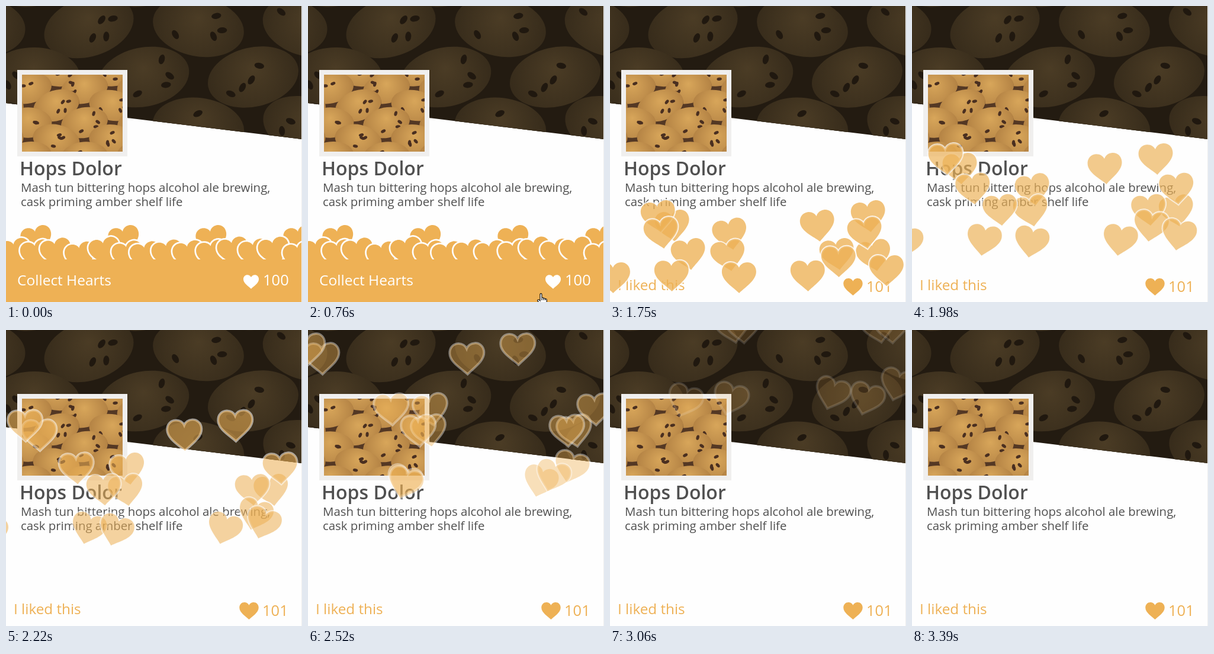
Write an HTML page with a canvas that moves like this. It is 500 px wide and 500 px high and loops after 4.56 s.

```html
<!DOCTYPE html>
<html lang="en">
<head>
<meta charset="utf-8">
<title>Collect Hearts</title>
<style>
  html, body { margin: 0; height: 100%; overflow: hidden; background: #fefefe; }
  canvas { display: block; width: 100vw; height: 100vh; }
</style>
</head>
<body>
<canvas id="stage" width="500" height="500"></canvas>
<script>
const ctx = document.getElementById('stage').getContext('2d');
const LOOP = 4560, CURSOR_IN = 760, BURST = 1596, STEP = 77, BURST_END = 3367;
const ORANGE = '#eeb155', WHITE = '#fefefe', INK = '#505050';

const heartPath = new Path2D('M0 27C-10 17-29 6-29-9C-29-19-22-25-14-25C-7-25-2-21 0-16' +
  'C2-21 7-25 14-25C22-25 29-19 29-9C29 6 10 17 0 27Z');
const handPath = new Path2D('M5 2.5Q5 .7 6.5 .7T8 2.5V8Q10 7 11 8.7Q13 8 13.7 9.7' +
  'Q16.3 9 16.3 12V15Q16 18 14.5 19V22H7.5V20Q5 17 1 13.5Q0 11.5 2 11Q3.5 11 5 13Z');

// Hearts of a flow drift in a straight line (px per ms) while turning towards a tilt.
// Two steps into the burst they stand at xs, alternately below and above y by spread.
const flows = [
  { vx: -.107, vy: -.42, tilt: -2, y: 363, spread: 8, xs: [106, 82, 351, 437] },
  { vx: .006, vy: -.326, tilt: -10, y: 403, spread: 18, xs: [446, 203, 200] },
  { vx: .07, vy: -.324, tilt: -4, y: 401, spread: 18, xs: [133, 87, 384, 431] },
  { vx: .076, vy: -.259, tilt: 16, y: 443, spread: 12, xs: [104, 386, 334] },
  { vx: -.07, vy: -.259, tilt: 18, y: 452, spread: 6, xs: [5, 467, 218] }
];

const radians = degrees => degrees * Math.PI / 180;

// Repeatable random numbers in -1..1
function randomizer(seed) {
  return () => {
    const n = Math.sin(seed++ * 12.9898) * 43758.5453;
    return (n - Math.floor(n)) * 2 - 1;
  };
}

function heart(x, y, scale, tilt, color, outline) {
  ctx.save();
  ctx.translate(x, y);
  ctx.rotate(radians(tilt));
  ctx.scale(scale, scale);
  if (outline) {
    ctx.strokeStyle = WHITE;
    ctx.lineWidth = outline;
    ctx.stroke(heartPath);
  }
  ctx.fillStyle = color;
  ctx.fill(heartPath);
  ctx.restore();
}

function text(str, x, y, size, color, weight = 400) {
  ctx.font = `${weight} ${size}px "Open Sans", "Noto Sans", sans-serif`;
  ctx.fillStyle = color;
  ctx.fillText(str, x, y);
}

function ellipse(x, y, rx, ry, tilt, color) {
  ctx.beginPath();
  ctx.ellipse(x, y, rx, ry, radians(tilt), 0, 7);
  ctx.fillStyle = color;
  ctx.fill();
}

// Cookies laid like bricks around (x0, y0), each with a few scattered chips
function cookies(outline, x0, y0, dx, dy, colors) {
  const random = randomizer(7);
  const rx = dx * .42, ry = dx * .27, chip = dx * .045;
  ctx.save();
  ctx.beginPath();
  outline.forEach(([x, y]) => ctx.lineTo(x, y));
  ctx.clip();
  ctx.fillStyle = colors.gap;
  ctx.fillRect(0, 0, 500, 260);
  for (let row = -2; row < 4; row++)
    for (let col = -1; col < 3; col++) {
      const x = x0 + dx * (col + (row & 1) / 2), y = y0 + dy * row;
      const tilt = random() * 18;
      const shade = ctx.createRadialGradient(x, y - ry * .3, 0, x, y, rx * 1.1);
      shade.addColorStop(0, colors.light);
      shade.addColorStop(1, colors.dark);
      ellipse(x, y + ry * .06, rx, ry, tilt, colors.gap);
      ellipse(x, y, rx, ry, tilt, shade);
      for (let i = 0; i < 4; i++)
        ellipse(x + random() * rx * .6, y + random() * ry * .6, chip, chip * .6, random() * 90, colors.chip);
    }
  ctx.restore();
}

function card() {
  ctx.fillStyle = WHITE;
  ctx.fillRect(0, 0, 500, 500);
  cookies([[0, 0], [500, 0], [500, 225], [0, 164]], 140, 35, 185, 85,
    { gap: '#231b11', light: '#4b3c25', dark: '#352a1a', chip: '#20180f' });
  ctx.fillStyle = '#f0efee';
  ctx.fillRect(19, 108, 186, 146);
  cookies([[27, 116], [197, 116], [197, 246], [27, 246]], 85, 168, 95, 29,
    { gap: '#543824', light: '#d8a65a', dark: '#b07f42', chip: '#4a2f20' });
  text('Hops Dolor', 23, 286, 32, INK, 600);
  text('Mash tun bittering hops alcohol ale brewing,', 25, 314, 20.4, INK);
  text('cask priming amber shelf life', 25, 338, 20.4, INK);
}

// A heap of hearts in which every fourth one stands tall behind the others
function pile() {
  const random = randomizer(3);
  const column = i => 15 + 37 * i;
  for (let i = 1; i < 14; i += 4) heart(column(i), 395, .9, -12, ORANGE, 6);
  for (let i = 0; i < 14; i++) heart(column(i) + random() * 6, 418 + random() * 5, .9, -12, ORANGE, 6);
}

function footer() {
  pile();
  ctx.fillStyle = ORANGE;
  ctx.fillRect(0, 428, 500, 72);
  text('Collect Hearts', 19, 472, 24.5, '#fff');
  heart(414, 465.5, .45, 0, '#fff');
  text('100', 434, 472, 25.5, '#fff');
}

function likedFooter() {
  text('I liked this', 13, 480, 24.3, ORANGE);
  heart(410.5, 474, .56, 0, ORANGE);
  text('101', 433, 483, 25.5, ORANGE);
}

function burst(t) {
  const age = t - BURST - 2 * STEP;
  const turn = Math.min(1, Math.max(0, (age + 250) / 650));
  ctx.globalAlpha = Math.min(1, .78 * (BURST_END - t) / (BURST_END - BURST - 2 * STEP));
  for (const { vx, vy, tilt, y, spread, xs } of flows)
    xs.forEach((x, i) => heart(x + vx * age, y + spread * (-1) ** i + vy * age,
      1, -12 + (tilt + 12) * turn, ORANGE, 4));
  ctx.globalAlpha = 1;
}

function cursor(t) {
  const p = Math.min(5, Math.floor((t - CURSOR_IN) / 74)) / 5;
  ctx.save();
  ctx.translate(387 - 40 * p, 485 - 67 * p);
  ctx.fillStyle = '#fff';
  ctx.strokeStyle = '#111';
  ctx.lineWidth = 1.2;
  ctx.fill(handPath);
  ctx.stroke(handPath);
  ctx.beginPath();
  for (const x of [8, 11, 13.7]) {
    ctx.moveTo(x, 9);
    ctx.lineTo(x, 12);
  }
  ctx.stroke();
  ctx.restore();
}

function draw(t) {
  card();
  if (t < BURST) {
    footer();
    if (t >= CURSOR_IN) cursor(t);
  } else {
    const step = Math.floor((t - BURST) / STEP);
    const swap = Math.min(1, (step + 1) / 3);
    ctx.globalAlpha = swap;
    likedFooter();
    ctx.globalAlpha = 1 - swap;
    if (swap < 1) footer();
    ctx.globalAlpha = 1;
    if (t < BURST_END) burst(BURST + step * STEP);
  }
  ctx.fillStyle = '#eee';
  ctx.fillRect(499, 0, 1, 500);
}

function tick() {
  draw(performance.now() % LOOP);
  requestAnimationFrame(tick);
}
tick();
</script>
</body>
</html>
```
